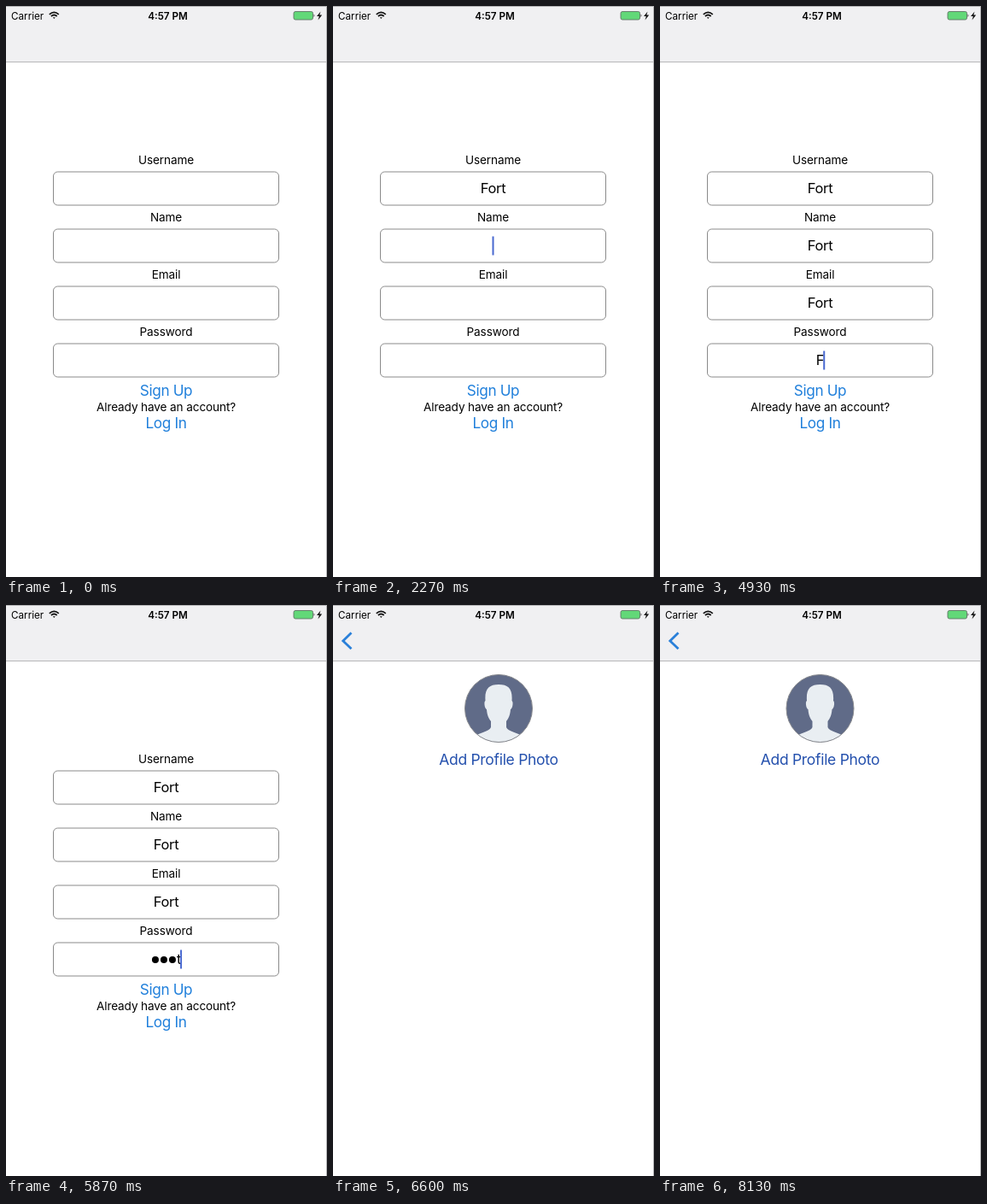
Write an HTML page that moves like this. It is 376 px wide and 668 px high and loops after 8.19 s.

```html
<!DOCTYPE html>
<html lang="en">
<head>
<meta charset="utf-8">
<title>Sign up</title>
<style>
  html, body { margin: 0; width: 100%; height: 100%; overflow: hidden; background: #fff; }
  svg { display: block; width: 376px; height: 668px; font-family: Inter, "Liberation Sans", sans-serif; }
  .mid { text-anchor: middle; }
  .label { font-size: 13.6px; letter-spacing: -.12px; }
  .link { font-size: 17.2px; letter-spacing: -.35px; fill: #1f7fdb; }
  .value { font-size: 16.5px; letter-spacing: -.3px; }
  .add { font-size: 17.5px; letter-spacing: -.3px; fill: #2450ad; }
  .box { fill: #fff; stroke: #8a8a8a; }
</style>
</head>
<body>
<svg viewBox="0 0 376 668">
  <defs><clipPath id="round"><circle cx="187.5" cy="121" r="39.5"/></clipPath></defs>
  <rect width="376" height="668" fill="#fff"/>

  <g id="form">
    <g id="fields"></g>
    <text class="mid link" x="187.5" y="456">Sign Up</text>
    <text class="mid label" x="187.5" y="473.5">Already have an account?</text>
    <text class="mid link" x="187.5" y="493.5">Log In</text>
  </g>

  <g id="profile">
    <rect y="65" width="376" height="603" fill="#fff"/>
    <g clip-path="url(#round)">
      <rect x="147" y="81" width="81" height="81" fill="#606b88"/>
      <path fill="#e9eef2" d="M172 112C171 98 176 93 187.500 93S204 98 203 112C205 113 204 121 201.500 122C201 129 199 133 196.500 136V143C198 148 211 149 217 155V162H158V155C164 149 177 148 178.500 143V136C176 133 174 129 173.500 122C171 121 170 113 172 112Z"/>
    </g>
    <circle cx="187.5" cy="121" r="39.5" fill="none" stroke="#85878c"/>
    <text class="mid add" x="187.5" y="186.500">Add Profile Photo</text>
  </g>

  <rect width="376" height="65" fill="#f0f0f2"/>
  <path d="M0 65.500H376" stroke="#b7b7b9"/>
  <path id="back" d="M21.500 32.500L11.800 42L21.500 51.300" fill="none" stroke="#2a80d9" stroke-width="2.800"/>
  <text x="6" y="15.700" font-size="11.7">Carrier</text>
  <g fill="none" stroke="#111" stroke-width="1.700">
    <path d="M50.800 9.800Q56.300 4.800 61.800 9.800M52.900 12Q56.300 9 59.700 12"/>
    <path d="M54.800 13.300H57.800L56.300 15Z" fill="#111" stroke="none"/>
  </g>
  <text class="mid" x="189.5" y="15.700" font-size="11.7" font-weight="600">4:57 PM</text>
  <rect x="337" y="6.500" width="22.500" height="9.500" rx="2" fill="#62d878" stroke="#5f7565" stroke-width=".9"/>
  <path d="M360.500 9.500Q362.500 11.200 360.500 13Z" fill="#555"/>
  <path d="M368.500 6.500L364 12H366.800L365.500 16.500L370.200 10.500H367.300Z" fill="#111"/>
  <path d="M0 .5H376M375.500 0V668" fill="none" stroke="#b4b4b6"/>
</svg>

<script>
const LOOP = 8190, MID = 187.5, BLUR = 6130, PUSH = 6311;
const WORD = "Fort";
const $ = id => document.getElementById(id);

function add(parent, tag, attrs, text = "") {
  const el = document.createElementNS("http://www.w3.org/2000/svg", tag);
  for (const k in attrs) el.setAttribute(k, attrs[k]);
  el.textContent = text;
  return parent.appendChild(el);
}

const fields = [
  { name: "Username", focus: 1000, keys: [1270, 1400, 1530, 1670] },
  { name: "Name", focus: 2000, keys: [2470, 2600, 2670, 2800] },
  { name: "Email", focus: 3000, keys: [3670, 3800, 3930, 4070] },
  { name: "Password", focus: 4470, keys: [4930, 5070, 5200, 5330], secret: true }
];

fields.forEach((f, i) => {
  const g = $("fields"), y = 194 + i * 67;
  f.end = i < 3 ? fields[i + 1].focus : BLUR;
  add(g, "text", { class: "mid label", x: MID, y: y - 9 }, f.name);
  add(g, "rect", { class: "box", x: 55.5, y, width: 264, height: 39, rx: 5 });
  f.dots = WORD.split("").map(() => add(g, "circle", { cy: y + 20, r: 4 }));
  f.text = add(g, "text", { class: "value", y: y + 25 });
  f.caret = add(g, "rect", { y: y + 8.5, width: 2, height: 22, fill: "#4969d0" });
});

// Solid after a key press, then fades out and back in
function blink(age) {
  const p = age % 1000;
  if (p < 545) return 1;
  return p < 740 ? 1 - (p - 545) / 195 : p < 850 ? 0 : (p - 850) / 150;
}

function drawField(f, t) {
  const count = f.keys.filter(k => k <= t).length;
  const hidden = f.secret ? (t < f.end ? Math.max(0, count - 1) : count) : 0;
  f.text.textContent = WORD.slice(hidden, count);
  const width = hidden * 10 + (count > hidden ? f.text.getComputedTextLength() : 0);
  const left = MID - width / 2;
  f.dots.forEach((d, i) => {
    d.setAttribute("cx", left + 5 + i * 10);
    d.setAttribute("opacity", +(i < hidden));
  });
  f.text.setAttribute("x", left + hidden * 10);
  f.caret.setAttribute("x", left + width - 1);
  const last = count ? f.keys[count - 1] : f.focus;
  f.caret.setAttribute("opacity", t >= f.focus && t < f.end ? blink(t - last) : 0);
}

function draw(ms) {
  // The picture steps at 15 frames per second
  const t = Math.floor((ms % LOOP + 3) * 0.015) / 0.015 + 4;
  fields.forEach(f => drawField(f, t));

  // Critically damped spring pushes the next page in
  const u = Math.max(0, t - PUSH) * 0.0205;
  const rest = (1 + u) * Math.exp(-u), p = 1 - rest;
  $("profile").setAttribute("transform", `translate(${376 * rest})`);
  $("form").setAttribute("transform",
    `translate(${188 - 10 * p} 334) scale(${1 - 0.05 * p}) translate(-188 -334)`);
  $("form").setAttribute("opacity", 1 - 0.7 * p);
  $("back").setAttribute("opacity", Math.min(1, p * 1.8));
}

const start = performance.now();
function tick() {
  draw(performance.now() - start);
  requestAnimationFrame(tick);
}
tick();
</script>
</body>
</html>
```
